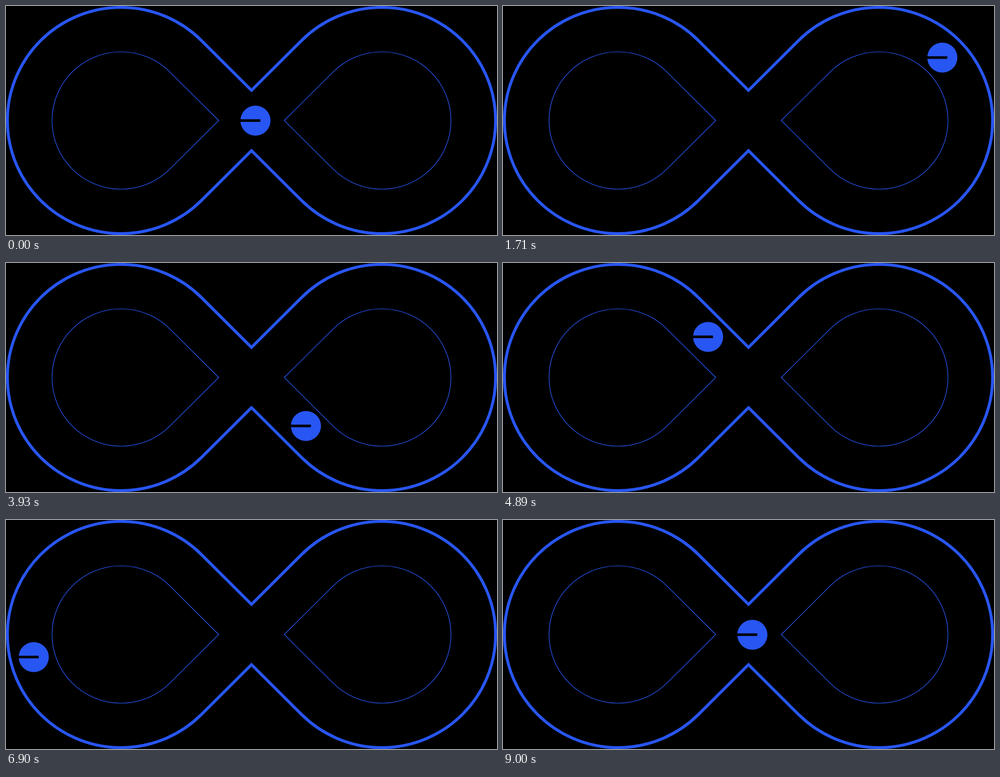
An HTML page for the animation above (9030 ms loop, 864 px wide and 405 px high).

```html
<!DOCTYPE html>
<html>
<head>
<meta charset="utf-8">
<style>
  html, body { margin: 0; width: 100%; height: 100%; overflow: hidden; background: #000; }
  svg { display: block; width: 864px; height: 405px; }
  path { fill: none; stroke: #2856f3; }
  circle { fill: #2856f3; }
  #route { stroke: none; }
</style>
</head>
<body>
<svg viewBox="0 0 864 405">
  <path stroke-width="5.1" stroke-miterlimit="10"
    d="M432 149.2L343.9 61.1A200 200 0 1 0 343.9 343.9L432 255.8L520.1 343.9A200 200 0 1 0 520.1 61.1Z"/>
  <path stroke-width="1.15"
    d="M374.3 202.5L288.4 116.6A121.5 121.5 0 1 0 288.4 288.4Z
       M489.7 202.5L575.6 116.6A121.5 121.5 0 1 1 575.6 288.4Z"/>

  <!-- Centre line of the figure eight: right loop clockwise, left loop back -->
  <path id="route"
    d="M438.8 202.9L544.4 93.5
       A157.4 157.4 0 0 1 661 41.8A161 161.4 0 0 1 661 364.5
       C608 364.5 578 335 531.8 292L312.3 84.8
       A158 158 0 0 0 203 40.8A159.5 160.4 0 0 0 203 361.6
       C250 361.6 295.4 340.6 329 307Z"/>

  <g id="puck">
    <circle r="26.5"/>
    <rect x="-27" y="-2.4" width="35.7" height="4.6"/>
  </g>
</svg>
<script>
const LOOP = 9030, TRAVEL = 9000; // ms; the puck rests at the end of each lap
const route = document.getElementById("route");
const puck = document.getElementById("puck");
const length = route.getTotalLength();

function draw() {
  const lap = Math.min(performance.now() % LOOP / TRAVEL, 1);
  const { x, y } = route.getPointAtLength(lap * length);
  puck.setAttribute("transform", `translate(${x} ${y})`);
  requestAnimationFrame(draw);
}
draw();
</script>
</body>
</html>
```
